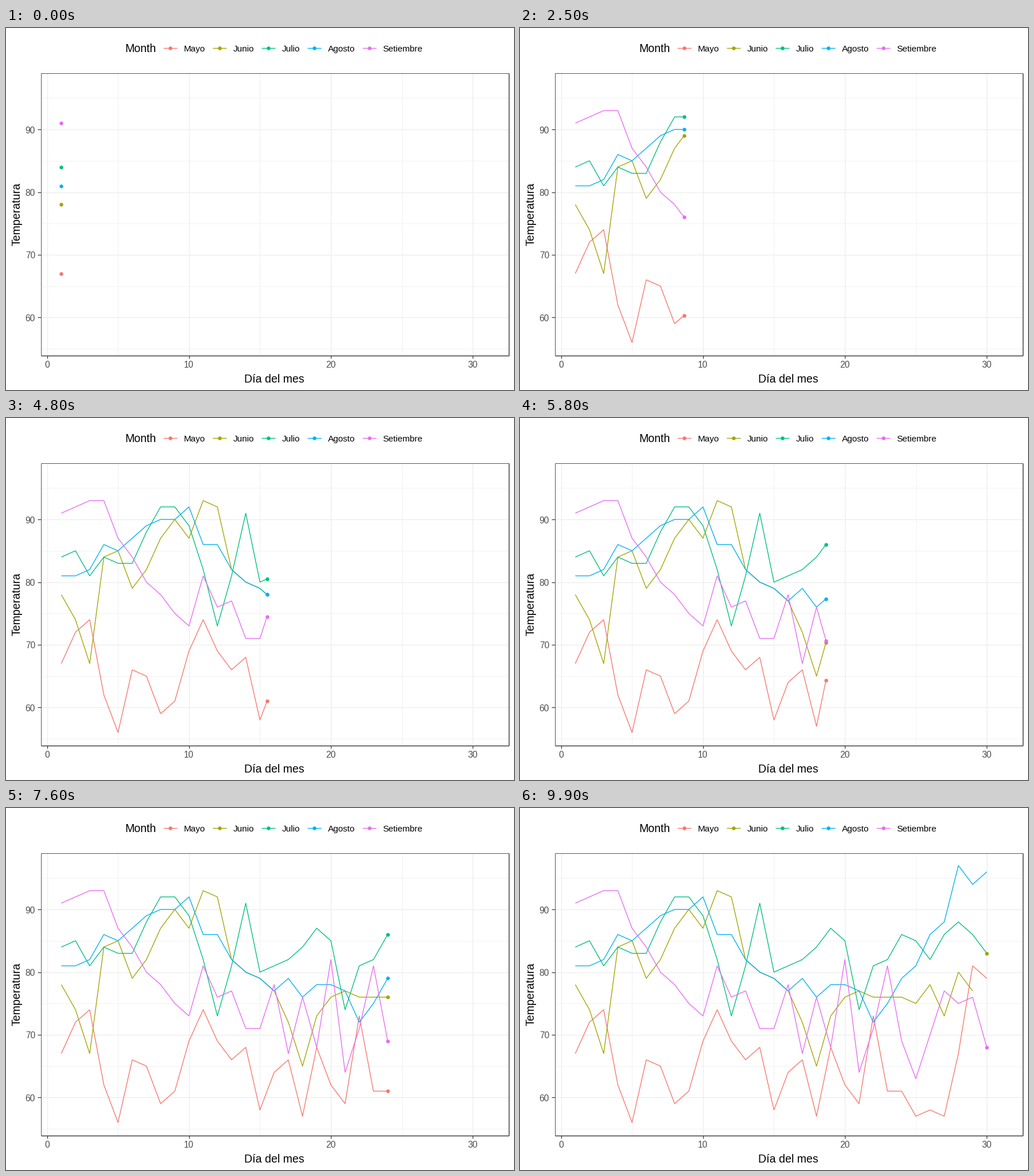
Write a matplotlib script that moves like this. It is 885 px wide and 632 px high and loops after 10 s.

```python
import numpy as np
import matplotlib.pyplot as plt
from matplotlib.animation import FuncAnimation

W, H, DPI = 885, 632, 64
PT = 72 / DPI  # points per pixel
FRAMES, INTERVAL = 100, 100
plt.rcParams["font.family"] = "Liberation Sans"

MAY = [67, 72, 74, 62, 56, 66, 65, 59, 61, 69, 74, 69, 66, 68, 58,
       64, 66, 57, 68, 62, 59, 73, 61, 61, 57, 58, 57, 67, 81, 79]
JUNE = [78, 74, 67, 84, 85, 79, 82, 87, 90, 87, 93, 92, 82, 80, 79,
        77, 72, 65, 73, 76, 77, 76, 76, 76, 75, 78, 73, 80, 77, 83]
JULY = [84, 85, 81, 84, 83, 83, 88, 92, 92, 89, 82, 73, 81, 91, 80,
        81, 82, 84, 87, 85, 74, 81, 82, 86, 85, 82, 86, 88, 86, 83]
AUGUST = [81, 81, 82, 86, 85, 87, 89, 90, 90, 92, 86, 86, 82, 80, 79,
          77, 79, 76, 78, 78, 77, 72, 75, 79, 81, 86, 88, 97, 94, 96]
SEPTEMBER = [91, 92, 93, 93, 87, 84, 80, 78, 75, 73, 81, 76, 77, 71, 71,
             78, 67, 76, 68, 82, 64, 71, 81, 69, 63, 70, 77, 75, 76, 68]

# label, colour, legend key centre, temperatures
MONTHS = [
    ("Mayo", "#F8766D", 285.5, MAY + [76]),
    ("Junio", "#A3A500", 372, JUNE),
    ("Julio", "#00BF7D", 457, JULY + [81]),
    ("Agosto", "#00B0F6", 537.3, AUGUST + [94]),
    ("Setiembre", "#E76BF3", 632.7, SEPTEMBER),
]

LEFT, RIGHT, TOP, BOTTOM = 60.5, 875.5, 78.5, 571.5


def px(day):
    return 71.6 + 24.72 * np.asarray(day)


def py(temp):
    return 286.5 - 10.94 * (np.asarray(temp) - 80)


fig = plt.figure(figsize=(W / DPI, H / DPI), dpi=DPI, facecolor="white")
ax = fig.add_axes([0, 0, 1, 1])
ax.set(xlim=(0, W), ylim=(H, 0))
ax.axis("off")


def stroke(x, y, color, width, z, **kw):
    return ax.plot(x, y, color=color, lw=width * PT, zorder=z,
                   solid_capstyle="butt", solid_joinstyle="round", **kw)[0]


def dot(x, y, color, z):
    return ax.plot(x, y, "o", color=color, ms=6.5 * PT, mew=0, zorder=z)[0]


def label(x, y, text, size, color="black", ha="left", **kw):
    ax.text(x, y, text, fontsize=size * PT, color=color, ha=ha,
            va="baseline", **kw)


def vline(x, color, width=1.1, z=1):
    stroke([x, x], [TOP, BOTTOM], color, width, z)


def hline(y, color, width=1.1, z=1):
    stroke([LEFT, RIGHT], [y, y], color, width, z)


def draw_panel():
    for day in (5, 15, 25):
        vline(px(day), "#F3F3F3")
    for temp in range(55, 100, 10):
        hline(py(temp), "#F3F3F3")
    for day in range(0, 31, 10):
        x = px(day)
        vline(x, "#EBEBEB", z=2)
        stroke([x, x], [BOTTOM, 577], "#333333", 1.2, 8)
        label(x, 593, str(day), 15.5, "#4D4D4D", "center")
    for temp in range(60, 91, 10):
        y = py(temp)
        hline(y, "#EBEBEB", z=2)
        stroke([55, LEFT], [y, y], "#333333", 1.2, 8)
        label(51, y + 6.5, str(temp), 15.5, "#4D4D4D", "right")
    vline(LEFT, "#555555", 1, 9)
    hline(TOP, "#555555", 1, 9)
    vline(RIGHT, "#333333", 1.4, 9)
    hline(BOTTOM, "#333333", 1.4, 9)
    label(467.5, 619, "Día del mes", 19.5, ha="center")
    ax.text(25, 325, "Temperatura", fontsize=19.5 * PT, rotation=90,
            rotation_mode="anchor", ha="center", va="baseline")


def draw_legend():
    label(207.6, 42.3, "Month", 19.5)
    for name, color, x, _ in MONTHS:
        stroke([x - 12, x + 12], [34.5, 34.5], color, 1.35, 3)
        dot([x], [34.5], color, 4)
        label(x + 24, 41, name, 15.2)


draw_panel()
draw_legend()
lines = [stroke([], [], m[1], 1.35, 4 + i / 10) for i, m in enumerate(MONTHS)]
dots = [dot([], [], m[1], 6 + i / 10) for i, m in enumerate(MONTHS)]

# each day starts on a whole frame
STARTS = np.round((FRAMES - 1) * np.arange(31) / 30)


def update(n):
    now = float(np.interp(n, STARTS, np.arange(1, 32)))
    for i, (_, _, _, temps) in enumerate(MONTHS):
        last = len(temps)
        days = np.arange(1, last + 1)
        if now < last:
            xs = np.append(days[:int(now)], now)
            tip = [now]
        else:
            # a finished month loses its last stretch, except the top one
            xs = days if i == len(MONTHS) - 1 else days[:-1]
            tip = [last] if now > last else []
        lines[i].set_data(px(xs), py(np.interp(xs, days, temps)))
        dots[i].set_data(px(tip), py(np.interp(tip, days, temps)))
    return lines + dots


anim = FuncAnimation(fig, update, frames=FRAMES, interval=INTERVAL,
                     repeat=True, repeat_delay=0)
plt.show()
```
